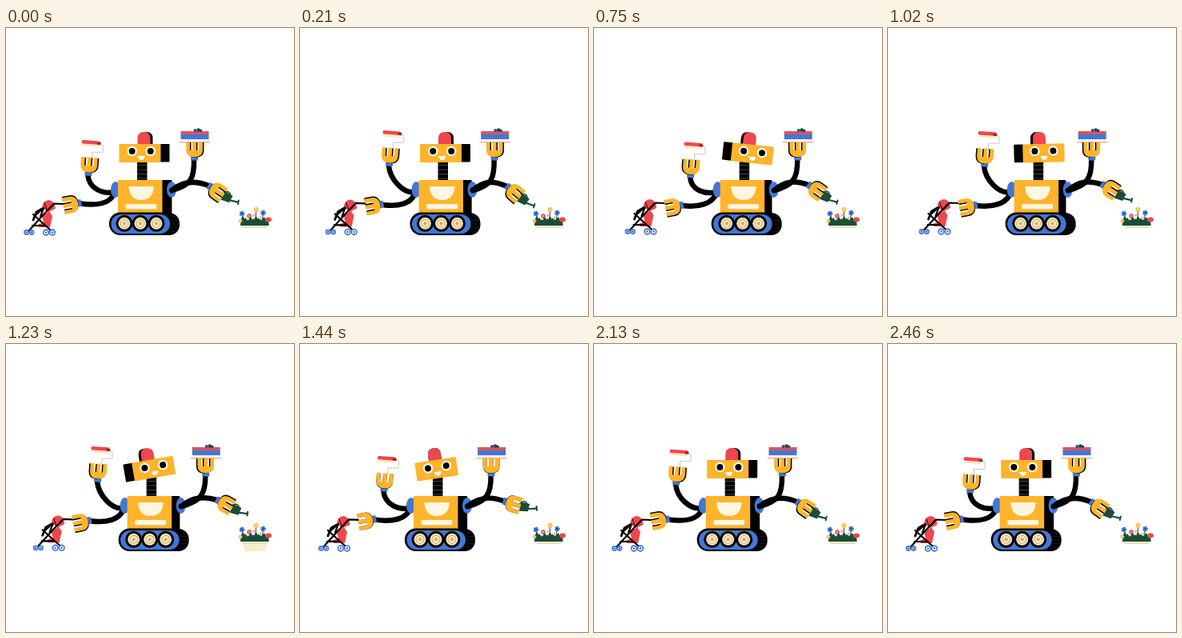
Write an HTML page with a canvas that moves like this. It is 360 by 360 pixels and loops after 2490 ms.

```html
<!DOCTYPE html>
<html>
<head>
<meta charset="utf-8">
<style>
html, body { margin: 0; width: 100%; height: 100%; overflow: hidden; background: #fff; }
canvas { display: block; width: 360px; height: 360px; }
</style>
</head>
<body>
<canvas id="stage"></canvas>
<script>
const LOOP = 2490;
const YELLOW = '#ffb42b', BLUE = '#4277d6', BLACK = '#000', RED = '#ee474e',
      CREAM = '#fff6e2', TAN = '#cfa765', GREEN = '#1b4d36', WHITE = '#fff';
const canvas = document.getElementById('stage');
const dpr = window.devicePixelRatio || 1;
canvas.width = canvas.height = 360 * dpr;
const c = canvas.getContext('2d');

// Eased value at time t through [time, value] pairs
function key(t, ...keys) {
  if (t <= keys[0][0]) return keys[0][1];
  for (let i = 1; i < keys.length; i++) {
    const [t0, a] = keys[i - 1], [t1, b] = keys[i];
    if (t < t1) {
      const p = (t - t0) / (t1 - t0);
      return a + (b - a) * p * p * (3 - 2 * p);
    }
  }
  return keys[keys.length - 1][1];
}

function rect(x, y, w, h, color, r = 0) {
  c.fillStyle = color;
  c.beginPath();
  c.roundRect(x, y, w, h, r);
  c.fill();
}
function oval(x, y, rx, ry, color) {
  c.fillStyle = color;
  c.beginPath();
  c.ellipse(x, y, rx, ry, 0, 0, 7);
  c.fill();
}
const dot = (x, y, r, color) => oval(x, y, r, r, color);
function ring(x, y, r, color, width) {
  c.strokeStyle = color;
  c.lineWidth = width;
  c.beginPath();
  c.arc(x, y, r, 0, 7);
  c.stroke();
}
function fill(d, color) {
  c.fillStyle = color;
  c.fill(new Path2D(d));
}
function line(d, color, width) {
  c.strokeStyle = color;
  c.lineWidth = width;
  c.stroke(new Path2D(d));
}
function at(x, y, degrees, draw) {
  c.save();
  c.translate(x, y);
  c.rotate(degrees * Math.PI / 180);
  draw();
  c.restore();
}

function hand(x, y, degrees, shade) {
  at(x, y, degrees, () => {
    rect(-4.5, 8, 9, 5.5, BLUE, 1);
    const fork = 'M-8 -9.5V0Q-8 7 0 7Q8 7 8 0V-9.5M0 -9.5V6';
    c.lineCap = 'butt';
    at(shade, 0.5, 0, () => line(fork, BLACK, 4.8));
    line(fork, YELLOW, 4.8);
    fill('M-8 1H8Q8 9 0 9Q-8 9 -8 1Z', YELLOW);
    c.lineCap = 'round';
  });
}

function roller() {
  line('M13 -25H17.5V-16H4V-8', '#b9b9b9', 0.8);
  at(2, -27, 4, () => {
    rect(-11, -3, 23, 6.8, '#ffe6bd', 2);
    rect(-11, -3.5, 23, 4.4, RED, 2);
    rect(8, -2, 5, 3, '#8e2a30', 1);
  });
}

function cake() {
  rect(-17, -23, 35, 4.2, '#d9555c');
  rect(-17, -19, 35, 6.2, BLUE);
  rect(-17, -12.8, 35, 3, '#f7f3ea');
  rect(-19, -9.9, 39, 1.4, '#e8b9a2', 0.7);
  dot(1, -24, 2, '#2f4f9f');
  dot(5, -24.5, 2.3, GREEN);
  dot(8, -23.7, 1.8, '#283c70');
}

function wateringCan() {
  line('M8 -3Q13 -9 17 -4', GREEN, 1.6);
  fill('M9 -5L20 -4.5L20 5L9 7Z', GREEN);
  line('M19 2L29 -1', GREEN, 2.2);
  line('M29 -3.5L30.5 1', GREEN, 2);
}

function stroller() {
  fill('M45 225Q46 215 54 215Q61.5 217 61.5 226L53 230Z', RED);
  fill('M45 235L54 229L58 235L55 249H41L39 246L47 243Z', RED);
  line('M72 220L60 219.5L48 232L28 254M34 233L56 253M37 234L47 225L43 236M33 247H48', BLACK, 2.2);
  line('M34 240L38 230L45 226', BLACK, 2.8);
  line('M48 219L51 227M54 227L59 222', BLACK, 1);
  for (const [x, r] of [[25.5, 2.6], [32, 2.6], [50, 3.4], [58, 3.4]]) {
    dot(x, 255.5, r, '#dfe9fb');
    ring(x, 255.5, r, BLUE, 1.6);
    dot(x, 255.5, 0.9, '#1b315f');
  }
}

function flower(x, y, r, color, heart) {
  line(`M${x} ${y}L${310 + (x - 310) * 0.8} 245`, GREEN, 1);
  for (let i = 0; i < 5; i++) {
    const a = i * 1.257;
    dot(x + r * Math.cos(a), y + r * Math.sin(a), r * 0.75, color);
  }
  dot(x, y, r * 0.55, heart);
}

function garden(potShown) {
  if (potShown) fill('M295.5 248H326.5L323.5 259H298.5Z', '#f8edc5');
  for (let i = 0; i < 10; i++) {
    const x = 296 + i * 3.3, top = 235 + (i * 7 % 5);
    fill(`M${x - 3} 247Q${x - 3} ${top + 3} ${x} ${top}Q${x + 3} ${top + 3} ${x + 3} 247Z`, GREEN);
  }
  flower(295, 232, 2, BLUE, '#203a7a');
  flower(321.5, 231, 2, BLUE, '#203a7a');
  flower(312.5, 227, 1.9, '#f6bd45', CREAM);
  flower(304, 235, 1.7, '#d9434a', CREAM);
  flower(318, 237, 1.4, CREAM, RED);
  flower(293, 241, 1.5, '#f6bd45', CREAM);
  oval(328, 239.5, 4, 3, '#e5484f');
  dot(310, 234, 1.7, '#f1b59c');
  rect(295.5, 247.5, 31, 2.6, '#e8e0b4', 1);
}

function head(turn, tilt) {
  at(169, 182, tilt, () => {
    c.translate(-169, -182);
    const x = 171.5 - 5 * turn;
    const dome = 'M163.5 146V138Q163.5 130 171.5 130Q179.5 130 179.5 138V146Z';
    at(3 * turn, 0, 0, () => fill(dome, BLACK));
    fill(dome, RED);
    const side = 12 * Math.abs(turn);
    rect(turn > 0 ? x + 25 : x - 25 - side, 145, side, 22.5, BLACK, 1);
    rect(x - 26, 145, 52, 23, YELLOW, 1);
    const face = x + 0.6 + 0.6 * turn;
    for (const dx of [-11, 12]) {
      dot(face + dx, 154, 6.2, WHITE);
      dot(face + dx, 154, 4, BLACK);
    }
    at(face, 160, 0, () => fill('M-4 0H5Q4 5 0.5 5Q-3 5 -4 0Z', WHITE));
  });
}

function body(roll, side) {
  rect(150, 231, 66, 28, BLACK, 13);
  rect(190, 190, 4.5 + side, 42, BLACK, 1);
  oval(136, 202, 6, 10, BLUE);
  oval(206, 202, 6, 10, BLUE);
  rect(139, 190, 55.5, 42, YELLOW);
  fill('M152.5 198H184Q183 215 168 215Q153.5 215 152.5 198Z', CREAM);
  rect(148.5, 220, 39, 6.2, CREAM, 2);
  rect(128, 230.5, 78, 28.5, BLACK, 14);
  rect(130.5, 233, 73.5, 24, BLUE, 12);
  for (const x of [147, 167, 187]) {
    dot(x, 244.3, 10.5, BLACK);
    dot(x, 244.3, 7.5, '#f9e7bd');
    at(x, 244.3, roll, () => {
      c.setLineDash([2, 1]);
      ring(0, 0, 5, TAN, 1);
      c.setLineDash([]);
      dot(0, 0, 2, TAN);
    });
  }
  for (let y = 236; y < 256; y += 4.5) line(`M207 ${y}H213.5`, '#3a3a3a', 0.5);
}

const slide = t => key(t, [-30, 0], [460, 18], [1020, 18], [1560, 0]);

function draw(t) {
  c.setTransform(dpr, 0, 0, dpr, 0, 0);
  c.fillStyle = WHITE;
  c.fillRect(0, 0, 360, 360);
  c.lineCap = c.lineJoin = 'round';

  const s = slide(t), late = slide(t - 30);
  const push = key(t, [0, 0], [420, 19], [700, 16.5], [1080, 16.5], [1500, 0]);
  const turn = key(t, [200, 1], [640, -1], [1230, -1], [1650, 1]);
  const tilt = key(t, [420, 0], [700, 6], [800, 6], [1260, -10], [1380, -9], [1800, 1], [2200, 0]);
  const pour = key(t, [0, 120], [400, 132], [750, 122], [1150, 118], [1440, 103], [1860, 121], [2490, 120]);
  const wave = Math.cos((t / 830 - 0.37) * 2 * Math.PI);
  const shade = 1.5 * turn;

  const paint = { x: 103.5 + s, y: 165.5 - 8.4 * wave };
  const serve = { x: 235.5 + late * 1.07, y: 152 };
  const water = {
    x: 264 + late * 0.78 - key(t, [0, 0], [420, 3], [700, 0]),
    y: key(t, [0, 204], [420, 207], [750, 203], [1440, 200], [1860, 204])
  };
  const pram = { x: 81 + push * 1.06, y: 221 + push * 0.15 };

  garden(t >= 1140 && t < 1350);
  at(push, -push * 0.06, 0, stroller);

  const L = 135.7 + s, R = 207 + s;
  const arm = d => line(d, BLACK, 6.5);
  arm(`M${L} 205C${L - 15} 208 ${paint.x} ${paint.y + 30} ${paint.x - 1.5} ${paint.y + 12}`);
  arm(`M${L} 203C${L - 3} 221 ${pram.x + 30} ${pram.y + 1} ${pram.x + 12} ${pram.y - 1.5}`);

  at(s + 0.7, 0, 0, () => {
    rect(163, 166, 12.5, 25, BLACK);
    for (const y of [171.5, 177, 182.5, 188]) line(`M163.5 ${y}H175`, '#777', 0.6);
    body(s * 4, 12 - s * 0.15);
    head(turn, tilt);
  });

  arm(`M${R} 203C${R + 24} 197 ${serve.x} 188 ${serve.x - 0.5} 164`);
  const a = (pour + 4) * Math.PI / 180;
  const wx = water.x - 11 * Math.sin(a), wy = water.y + 11 * Math.cos(a);
  arm(`M${R} 203C${R + 14} 191 ${wx - 18} 190 ${wx} ${wy}`);

  at(paint.x, paint.y, 0, roller);
  at(serve.x, serve.y, 0, cake);
  at(water.x, water.y, pour - 90, wateringCan);
  hand(paint.x, paint.y, 4, shade);
  hand(serve.x, serve.y, 0, shade);
  hand(water.x, water.y, pour + 4, shade);
  hand(pram.x, pram.y, -101, shade);
}

const start = performance.now();
function frame() {
  draw((performance.now() - start) % LOOP);
  requestAnimationFrame(frame);
}
frame();
</script>
</body>
</html>
```
